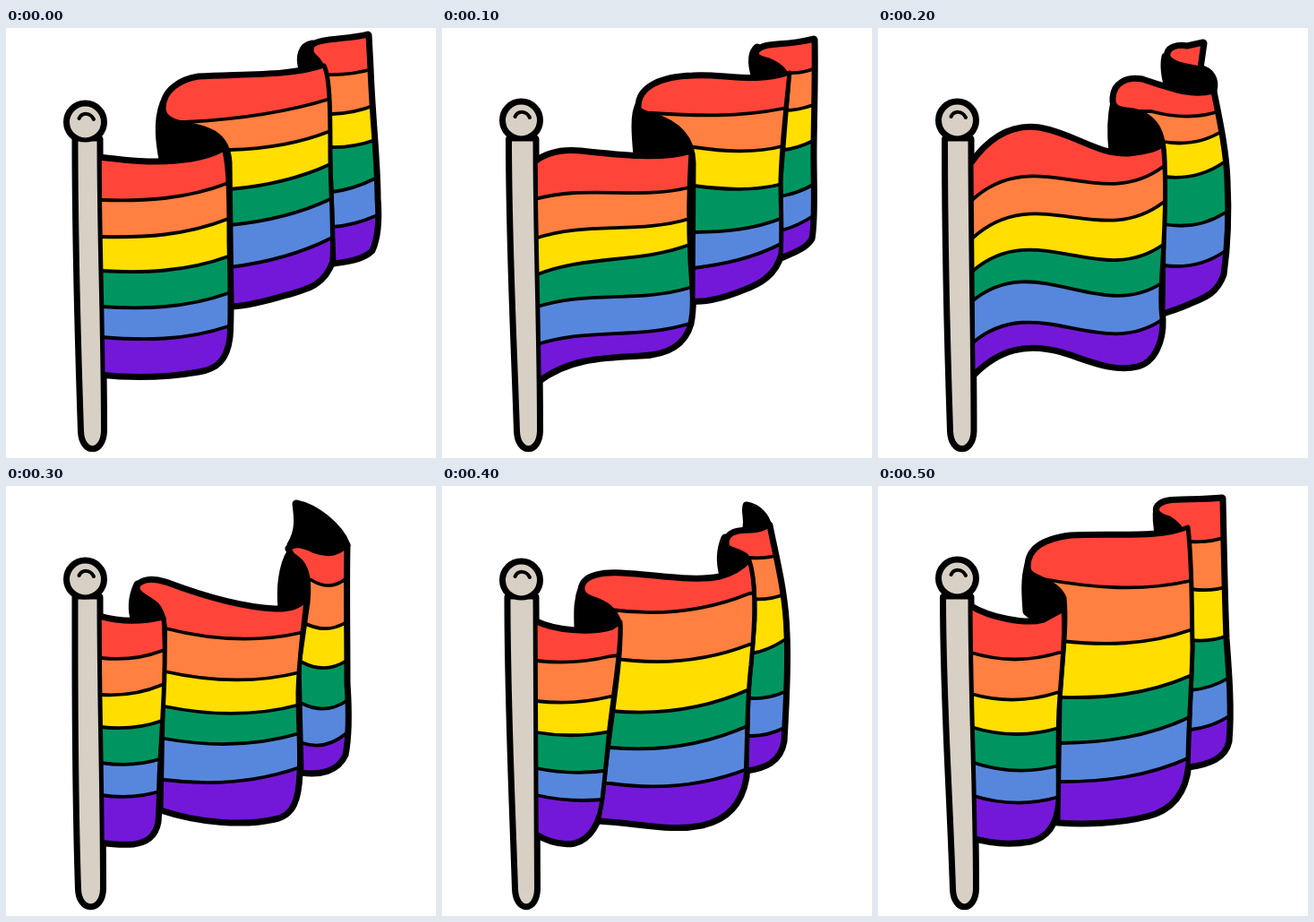
An HTML page with a canvas for the animation above (600 ms loop, 480 px wide and 480 px high).

```html
<!DOCTYPE html>
<html lang="en">
<head>
<meta charset="utf-8">
<title>Waving flag</title>
<style>
html, body { margin: 0; width: 100%; height: 100%; overflow: hidden; background: #fff; }
canvas { display: block; width: 480px; height: 480px; }
</style>
</head>
<body>
<canvas id="stage" width="480" height="480"></canvas>
<script>
const ctx = document.getElementById('stage').getContext('2d');
const COLORS = ['#ff453a', '#ff8040', '#ffde00', '#009560', '#5787dc', '#7318d8'];
const POLE = '#d8d0c5';
const STEP = 100;
const poses = [];

// One section of cloth: its outline, the x range of its seams (the top seam
// may start elsewhere), two bend amounts, and seam heights at both ends.
const panel = (d, topX, x0, x1, bend1, bend2, left = [], right = []) =>
  ({ shape: new Path2D(d), topX, x0, x1, bend1, bend2, left, right });

// Pole: left and right x at the top, then at the bottom.
function pose([tl, tr, bl, br], ballY, folds, ...panels) {
  const pole = new Path2D(
    `M${tl} 124C${tl} 240 ${bl - 4} 330 ${bl} 450C${bl + 1} 475 ${br - 1} 475 ${br} 450` +
    `C${br} 330 ${tr} 240 ${tr} 124Z`);
  const ball = new Path2D();
  ball.arc(88.5, ballY, 20, 0, Math.PI * 2);
  poses.push({ pole, ball, ballY, folds: new Path2D(folds), panels });
}

pose([78, 104, 84.5, 108.5], 105,
  'M176 84C168 105 172 130 175 147C200 150 230 145 244 136C240 118 215 110 176 92Z' +
  'M342 18C330 20 327 32 331 46L356 44L364 60C362 40 355 30 342 18Z',
  panel('M342 20C350 12 380 14 404 8L406 45C408 100 414 150 414 190C416 215 414 235 408 248C398 258 380 260 366 262L360 100C362 60 355 40 345 32C340 28 340 24 342 20Z',
    358, 364, 412, 3, 3, [52, 96, 133, 183, 222], [45, 86, 125, 168, 210]),
  panel('M176 90C176 70 195 58 215 55C260 52 320 55 355 42C362 55 362 100 362 140C362 180 366 220 364 260C355 285 340 290 310 298C290 304 270 309 252 310L250 150C248 120 230 112 200 107C185 104 176 98 176 90Z',
    200, 250, 362, 6, 8, [105, 136, 180, 220, 267], [79, 115, 152, 191, 235]),
  panel('M104 145C130 148 160 152 190 149C215 147 232 142 243 135C249 150 249 200 249 240C250 280 251 320 249 345C246 370 235 380 215 383C180 389 140 390 104 386Z',
    106, 106, 248, 8, 12, [192, 233, 271, 311, 345], [173, 213, 255, 296, 333]));

pose([75.5, 104, 84.5, 108.5], 103,
  'M220 86C214 96 216 120 218 142L230 146C250 145 265 143 280 138C278 115 255 100 220 90Z' +
  'M352 22C345 28 345 40 350 56L386 52L388 62C388 45 375 36 352 30Z',
  panel('M352 26C360 16 380 22 415 13C416 50 414 110 414 140C414 180 416 215 412 235C405 246 392 250 378 256L378 170L386 70C388 50 380 42 365 36C352 33 350 30 352 26Z',
    386, 382, 414, 2, 2, [50, 92, 136, 187, 225], [46, 86, 126, 175, 210]),
  panel('M220 88C220 66 245 55 280 54C310 51 350 64 388 50C384 90 379 130 378 170C378 200 380 230 378 252C372 275 355 285 335 292C315 300 295 305 280 304L281 150C280 120 262 105 235 97C224 94 219 92 220 88Z',
    235, 281, 380, 5, 8, [95, 133, 176, 228, 268], [90, 132, 174, 212, 240]),
  panel('M104 150C118 139 135 136 155 138C200 143 245 148 278 138C276 170 275 220 277 260C279 290 281 310 277 330C270 355 250 364 222 365C180 367 140 368 106 395Z',
    104, 104, 276, -12, 10, [191, 235, 276, 312, 354], [178, 213, 242, 290, 330]));

pose([75.5, 103, 81.5, 106], 103,
  'M264 82C260 100 260 120 262 138C285 142 305 138 318 130C316 105 300 92 264 86Z' +
  'M321 32C318 45 322 60 325 70C340 76 362 76 374 70C377 58 372 48 358 45C340 42 328 38 321 32Z',
  panel('M324 32C322 22 335 19 345 21L363 17L359 45C350 42 330 42 324 32Z', 324, 324, 362, 0, 0),
  panel('M263 78C264 62 278 55 295 58C325 68 350 78 374 71C382 110 388 140 389 170C391 210 390 240 385 275C378 295 365 300 350 306C340 311 330 314 318 318L320 150C320 115 310 98 285 92C270 90 262 90 263 78Z',
    305, 319, 386, 8, 10, [93, 127, 166, 219, 265], [91, 114, 150, 207, 250]),
  panel('M104 152C125 122 150 108 180 112C220 119 245 143 280 141C300 139 312 136 318 130C322 160 321 200 319 240C317 280 314 300 317 325C318 350 308 372 290 377C262 384 235 370 205 361C165 350 135 358 106 387Z',
    105, 105, 318, -52, 40, [192, 235, 272, 305, 352], [155, 195, 242, 284, 325]));

pose([78, 104, 81.5, 107.5], 104,
  'M147 110C140 125 140 140 144 150L176 147C180 140 178 132 165 122Z' +
  'M324 20C345 24 372 45 380 66C372 76 355 78 340 72L318 66C328 50 326 35 324 20Z' +
  'M318 74C308 90 306 115 308 136L330 130L336 128C343 110 340 95 318 74Z',
  panel('M316 70C322 64 335 68 345 73C360 78 372 76 380 66C379 110 380 170 380 220C382 250 382 280 378 300C370 318 350 322 330 319L327 200L337 130C340 100 335 85 320 77Z',
    341, 331, 380, 9, 10, [105, 152, 197, 243, 287], [103, 152, 195, 240, 276]),
  panel('M147 112C152 104 165 104 178 108C215 122 260 136 300 138C318 139 328 134 335 127C332 160 327 190 326 230C326 270 329 300 327 320C326 350 320 367 300 371C265 379 215 375 173 361L176 200C178 165 180 145 168 132C155 122 146 120 147 112Z',
    178, 177, 328, 11, 13, [159, 207, 246, 282, 328], [164, 208, 244, 276, 314]),
  panel('M104 146C125 152 150 153 176 147C179 190 176 240 173 290C170 330 171 350 169 375C166 392 155 397 142 399C130 400 118 399 104 397Z',
    106, 106, 174, 5, 6, [192, 233, 269, 309, 345], [184, 222, 262, 304, 340]));

pose([74, 104, 82.5, 105.5], 105,
  'M157 112C150 130 152 145 152 160C170 163 190 160 199 152C198 138 185 130 157 114Z' +
  'M340 22C352 24 362 34 364 46C352 50 345 48 340 46C342 36 338 30 340 22Z' +
  'M316 58C310 72 310 85 314 100L343 86C344 78 335 70 316 62Z',
  panel('M318 64C318 52 330 50 345 50C355 50 362 46 365 44C372 80 383 120 384 165C386 200 383 250 381 285C377 308 360 314 340 317L342 230L349 150C350 110 346 90 340 78C330 70 318 72 318 64Z',
    342, 345, 382, 3, 3, [80, 126, 187, 237, 279], [75, 121, 172, 230, 270]),
  panel('M157 112C160 100 180 97 200 98C240 100 280 108 310 102C325 98 335 92 343 83C352 110 349 160 345 200C340 240 341 290 339 325C334 355 318 372 290 378C255 385 225 376 175 373L187 280C195 220 200 185 199 155C194 135 180 130 170 126C158 122 156 118 157 112Z',
    188, 188, 343, 13, 15, [138, 192, 251, 292, 332], [120, 177, 227, 267, 315]),
  panel('M103 151C125 162 165 166 190 158L199 152C200 180 193 220 187 270C184 300 182 325 179 350C175 378 165 393 148 398C132 401 118 396 103 387Z',
    105, 105, 188, 5, 5, [195, 240, 275, 315, 345], [190, 235, 274, 317, 349]));

pose([73.5, 103, 84.5, 108.5], 103,
  'M168 88C163 105 165 125 166 140C180 154 200 148 208 138C210 118 195 106 168 92Z' +
  'M312 24C310 35 312 48 314 58L346 46L350 62C348 45 335 38 312 26Z',
  panel('M312 24C318 12 345 18 384 14C385 60 386 120 388 170C391 210 394 250 391 285C387 303 370 310 346 313L351 180L347 90C350 60 340 45 325 36C312 32 310 28 312 24Z',
    347, 349, 390, 3, 4, [62, 115, 172, 228, 272], [56, 112, 167, 215, 258]),
  panel('M168 90C168 68 190 59 215 56C260 53 315 60 346 46C351 90 350 130 351 180C350 230 346 270 346 310C343 345 325 362 300 368C270 376 230 377 201 375L203 240C206 190 211 155 208 125C203 112 190 107 180 102C172 99 168 96 168 90Z',
    185, 204, 348, 9, 13, [104, 173, 236, 287, 330], [106, 161, 212, 258, 303]),
  panel('M102 134C125 148 165 156 185 150L207 138C210 170 204 210 202 250C200 290 202 330 201 352C199 378 188 392 170 396C148 400 125 398 105 392Z',
    104, 104, 202, 10, 10, [186, 232, 269, 308, 345], [186, 230, 270, 312, 347]));

function paint(shape, color, width) {
  ctx.fillStyle = color;
  ctx.fill(shape);
  ctx.lineWidth = width;
  ctx.stroke(shape);
}

function seam(p, i) {
  const a = p.left[i], b = p.right[i];
  const x = i ? p.x0 : p.topX, w = p.x1 - x;
  const path = new Path2D();
  path.moveTo(x - 40, a);
  path.lineTo(x, a);
  path.bezierCurveTo(
    x + w / 3, a + (b - a) / 3 + p.bend1,
    x + w * 2 / 3, a + (b - a) * 2 / 3 + p.bend2,
    p.x1, b);
  path.lineTo(p.x1 + 40, b - 4);
  return path;
}

function drawPanel(p) {
  ctx.save();
  ctx.clip(p.shape);
  ctx.fillStyle = COLORS[0];
  ctx.fill(p.shape);
  p.left.forEach((_, i) => {
    const line = seam(p, i);
    const below = new Path2D(line);
    below.lineTo(p.x1 + 40, 480);
    below.lineTo((i ? p.x0 : p.topX) - 40, 480);
    paint(below, COLORS[i + 1], 0.01);
    ctx.lineWidth = 3.8;
    ctx.stroke(line);
  });
  ctx.restore();
  ctx.lineWidth = 5;
  ctx.stroke(p.shape);
}

function draw({ pole, ball, ballY, folds, panels }) {
  ctx.fillStyle = '#fff';
  ctx.fillRect(0, 0, 480, 480);
  ctx.strokeStyle = '#000';
  ctx.lineJoin = ctx.lineCap = 'round';

  // heavy outer contour
  for (const s of [folds, pole, ball, ...panels.map(p => p.shape)]) paint(s, '#000', 9);
  panels.forEach(drawPanel);
  paint(pole, POLE, 5);
  paint(ball, POLE, 5);

  const shine = new Path2D(`M81.5 ${ballY - 4}C85 ${ballY - 11} 94 ${ballY - 11} 98 ${ballY - 3}`);
  ctx.lineWidth = 4;
  ctx.stroke(shine);
}

function tick() {
  draw(poses[Math.floor(performance.now() / STEP) % poses.length]);
  requestAnimationFrame(tick);
}
tick();
</script>
</body>
</html>
```
